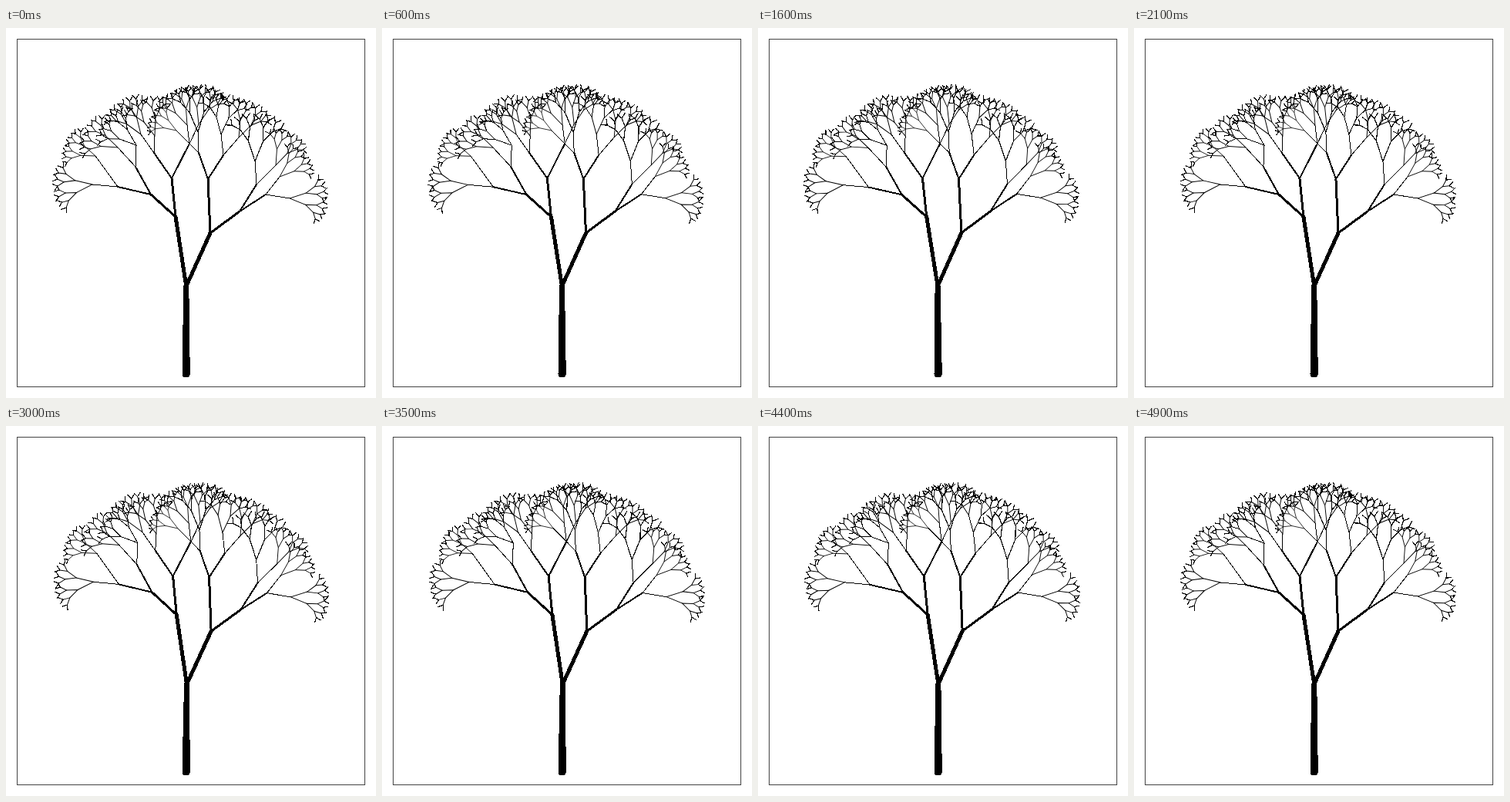
An HTML page without scripts that plays this animation: 480 px wide and 480 px high, repeating every 5000 ms.

```html
<!DOCTYPE html>
<html lang="en">
<head>
<meta charset="utf-8">
<title>Swaying tree</title>
<style>
@property --lean { syntax: "<angle>"; inherits: false; initial-value: 0deg; }
html, body { margin: 0; width: 100%; height: 100%; overflow: hidden; background: #fff; }
svg { display: block; width: 100%; height: 100%; }
.tree, .frame { fill: none; stroke: #000; stroke-width: 1; shape-rendering: crispEdges; }
.frame { stroke: #444; }
/* leaning through a property keeps the edges crisp */
.tree { stroke-linecap: round; transform-origin: 233.5px 449px; transform: rotate(var(--lean)); animation: sway 5s infinite; }
.tree path, #tip { vector-effect: non-scaling-stroke; }
#tip { stroke-width: 1.2; }
.trunk { fill: #000; stroke: none; }
/* the pose advances ten times a second */
@keyframes sway {
  0% { --lean: 0deg; animation-timing-function: steps(6); }
  12% { --lean: -.15deg; animation-timing-function: steps(3); }
  18% { --lean: .08deg; animation-timing-function: steps(7); }
  32% { --lean: -.35deg; animation-timing-function: steps(9); }
  50% { --lean: .25deg; animation-timing-function: steps(7); }
  64% { --lean: .4deg; animation-timing-function: steps(10); }
  84% { --lean: -.08deg; animation-timing-function: steps(4); }
  92% { --lean: .2deg; animation-timing-function: steps(3); }
  98%, 100% { --lean: 0deg; }
}
</style>
</head>
<body>
<svg viewBox="0 0 480 480">
  <defs>
    <!-- each fork carries two of the next smaller one -->
    <path id="tip" d="M-4-5.5L0 0L4.5-5"/>
    <g id="sprig">
      <path d="M-4.5-9L0 0L4.5-8"/>
      <use href="#tip" transform="translate(-4.5 -9) rotate(-16)"/>
      <use href="#tip" transform="translate(4.5 -8) rotate(22)"/>
    </g>
    <g id="fork">
      <path d="M-5-14L0 0L6-13.5"/>
      <use href="#sprig" transform="translate(-5 -14) rotate(-18)"/>
      <use href="#sprig" transform="translate(6 -13.5) rotate(22)"/>
    </g>
    <g id="twig">
      <path d="M-8-22L0 0L8-22"/>
      <use href="#fork" transform="translate(-8 -22) rotate(-19)"/>
      <use href="#fork" transform="translate(8 -22) rotate(19)"/>
    </g>
  </defs>

  <rect class="frame" x="14.5" y="14.5" width="451" height="451"/>

  <g class="tree">
    <path class="trunk" d="M228.5 449L230.3 335A3.5 3.5 0 0 1 237.3 335L238.8 449A5.2 5.2 0 0 1 228.5 449Z"/>
    <path stroke-width="5" d="M220 245L233.8 335L265 266"/>
    <path stroke-width="3" d="M188 216L220 245L215 195M262 196L265 266L303 238"/>
    <path stroke-width="2" d="M145 206L188 216L168 180M192 162L215 195L238 150M250 162L262 196L282 165M325 203L303 238L337 216"/>
    <path d="M112 203L145 206L116 166M145 155L168 180L169 152M175 138L192 162L193 140M221 133L238 150L250 125"/>
    <path d="M235 126L238 150L250 162L249 135M279 138L282 165L302 142M323 173L325 203L350 178M355 193L337 216L368 221"/>

    <use href="#twig" transform="translate(112 203) rotate(-97) scale(.98)"/>
    <use href="#twig" transform="translate(116 166) rotate(-68) scale(.82)"/>
    <use href="#twig" transform="translate(145 155) rotate(-66) scale(.94)"/>
    <use href="#twig" transform="translate(169 152) rotate(-50)"/>
    <use href="#twig" transform="translate(175 138) rotate(-34) scale(.98)"/>
    <use href="#twig" transform="translate(193 140) rotate(-18) scale(.98)"/>
    <use href="#twig" transform="translate(221 133) rotate(-58) scale(.72)"/>
    <use href="#twig" transform="translate(250 125) rotate(14) scale(.95)"/>
    <use href="#twig" transform="translate(235 126) rotate(-24) scale(.92)"/>
    <use href="#twig" transform="translate(249 135) rotate(-3) scale(1.18)"/>
    <use href="#twig" transform="translate(279 138) rotate(5)"/>
    <use href="#twig" transform="translate(302 142) rotate(25) scale(.95)"/>
    <use href="#twig" transform="translate(323 173) rotate(2) scale(1.2)"/>
    <use href="#twig" transform="translate(350 178) rotate(24) scale(.9)"/>
    <use href="#twig" transform="translate(355 193) rotate(49) scale(.86)"/>
    <use href="#twig" transform="translate(368 221) rotate(92) scale(.95)"/>
  </g>
</svg>
</body>
</html>
```
